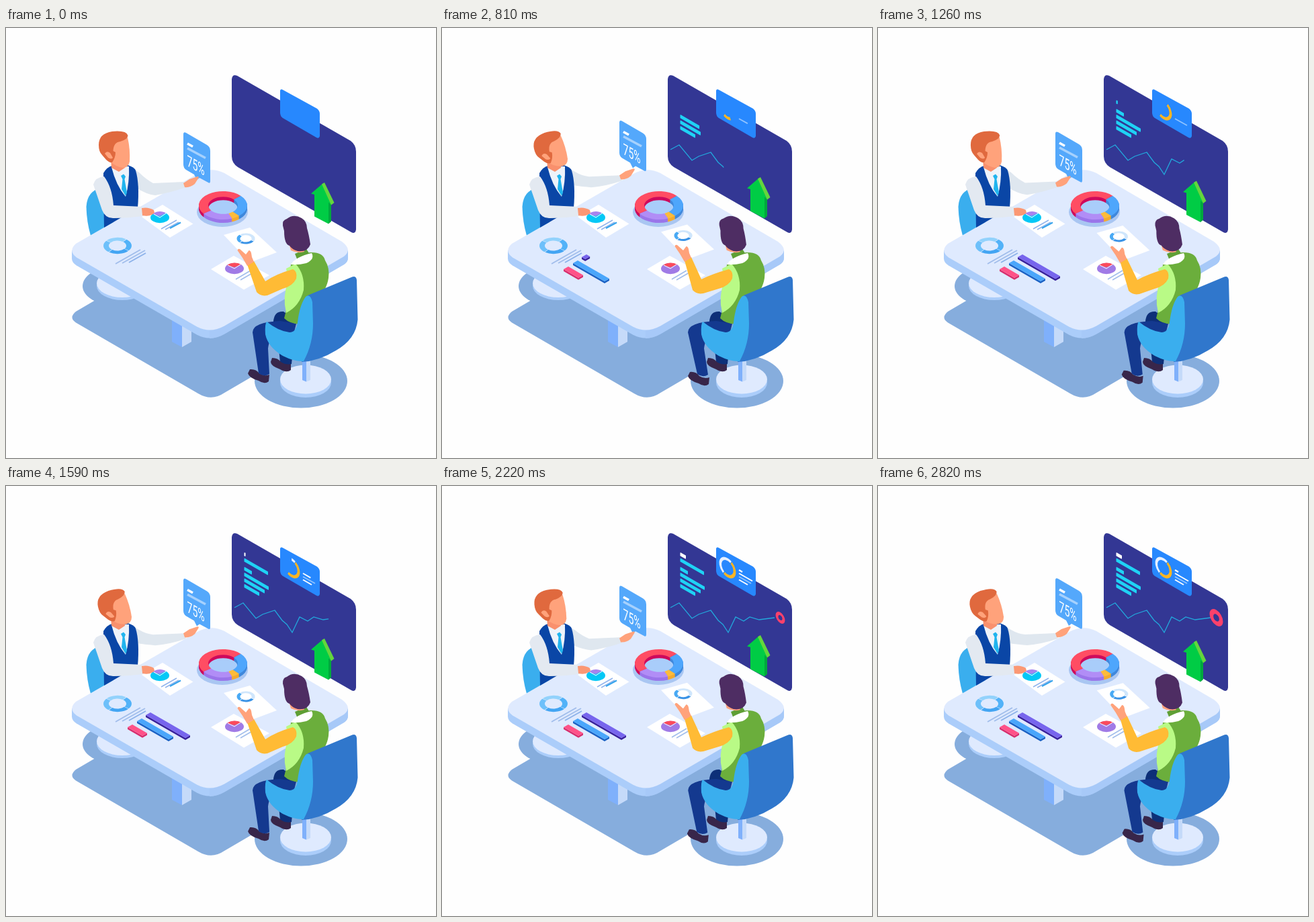
These frames come from a looping animation (640 by 640 pixels, 2.85 s). An HTML page with a canvas:

```html
<!DOCTYPE html>
<html lang="en">
<head>
<meta charset="utf-8">
<title>Meeting</title>
<style>
html, body { margin: 0; width: 100%; height: 100%; overflow: hidden; background: #fefefe; }
canvas { display: block; width: 640px; height: 640px; }
</style>
</head>
<body>
<canvas id="c" width="640" height="640"></canvas>
<script>
const g = document.getElementById('c').getContext('2d');
const LOOP = 2850, STEP = 30, ISO = [0.866, 0.5, 0, 1], RAD = Math.PI / 180;
const SHADE = '#86addd', PALE = '#dfeafe', EDGE = '#abcdfa', SKY = '#3aaeee';
const SKIN = '#ffa27b', NAVY = '#14398f', SHOE = '#38264a';

const clamp = v => Math.max(0, Math.min(1, v));
const smooth = v => { v = clamp(v); return v * v * (3 - 2 * v); };
const span = (t, a, b) => smooth((t - a) / (b - a));

function fill(d, color) {
  g.fillStyle = color;
  g.fill(new Path2D(d));
}
function oval(x, y, rx, ry, color) {
  g.fillStyle = color;
  g.beginPath();
  g.ellipse(x, y, rx, ry, 0, 0, 7);
  g.fill();
}
function line(x1, y1, x2, y2, color, w, k = 1) {
  if (k <= 0) return;
  g.strokeStyle = color;
  g.lineWidth = w;
  g.beginPath();
  g.moveTo(x1, y1);
  g.lineTo(x1 + (x2 - x1) * k, y1 + (y2 - y1) * k);
  g.stroke();
}
function at(x, y, draw, matrix = [1, 0, 0, 1]) {
  g.save();
  g.transform(...matrix, x, y);
  draw();
  g.restore();
}
function turn(x, y, deg, draw) {
  g.save();
  g.translate(x, y);
  g.rotate(deg * RAD);
  g.translate(-x, -y);
  draw();
  g.restore();
}
// Flat ring segment, angles in degrees
function ring(x, y, rx, ry, hole, a, b, color) {
  g.fillStyle = color;
  g.beginPath();
  g.ellipse(x, y, rx, ry, 0, a * RAD, b * RAD);
  g.ellipse(x, y, rx * hole, ry * hole, 0, b * RAD, a * RAD, true);
  g.fill();
}
function wedge(x, y, rx, ry, a, b, color) {
  g.fillStyle = color;
  g.beginPath();
  g.moveTo(x, y);
  g.ellipse(x, y, rx, ry, 0, a * RAD, b * RAD);
  g.fill();
}

function table() {
  // floor shadows and far chair
  oval(163, 384, 49, 29, SHADE);
  fill('M104 422L285 316Q305 305 325 315L500 417Q516 429 503 439L325 543Q306 556 286 544L104 438.500Q93 431 104 422Z', SHADE);
  oval(173, 384, 38, 21, EDGE);
  oval(173, 380, 38, 21, PALE);
  fill('M142 238Q121 242 119.500 266Q120 288 126 309L160 300 160 238Z', SKY);
  fill('M247 430H262V475L247 467Z', '#7fb0fb');
  fill('M262 430H276V467L262 475Z', '#c5daf9');
  // slab
  fill('M98 331V343Q98 349 105 353.500L284 456.500Q304 467 325 455.500L503 352Q509 348 509 342V331Z', EDGE);
  fill('M303 449V462Q314 462 325 455.500L503 352Q509 348 509 342V331Z', '#a7c9f8');
  fill('M104 321L285 217Q305 206 325 216L500 318Q516 330 503 340L325 443.500Q304 455 284 444.500L105 341.500Q92 332 104 321Z', PALE);
}

function tableCharts(t) {
  // flat ring and notes
  ['#52b2f8', '#43a5f3', '#6dc0fa', '#92d2fc'].forEach((c, i) =>
    ring(166, 324, 21, 12.2, 0.62, i * 90 - 50, i * 90 + 37, c));
  line(163, 351, 200, 330, '#a2beeb', 2);
  line(173, 350, 207, 331, '#a2beeb', 2);
  line(183, 349, 208, 335, '#8db2ea', 2);

  // raised ring
  oval(322, 274, 38, 22, '#a9c6f2');
  oval(323, 269, 30, 17, '#a9cdfa');
  const parts = [
    [144, 317, '#ff4d63', '#ce0a5c'], [-43, 48, '#4ea6fc', '#3f88dc'],
    [48, 68, '#fdbb3b', '#f3ab30'], [68, 144, '#b18df6', '#9a75ea']];
  for (let z = 5; z >= 0; z--)
    for (const [a, b, top, side] of parts)
      ring(323, 264 + z, 36, 21, 0.61, a, b, z ? side : top);

  bar(208, 341, 59, span(t, 690, 1350), '#7765ed', '#39219c');
  bar(195, 350, 47, span(t, 270, 600), '#4aa6fb', '#1b62c4');
  bar(181, 359, 22, span(t, 120, 360), '#ff5288', '#d82e6d');
}

function bar(x, y, len, k, top, side) {
  if (k <= 0) return;
  const w = len * k, h = w * 0.577;
  at(x, y, () => {
    fill(`M0 0L${w} ${h}L${w + 7} ${h - 4}v3L${w} ${h + 3}L0 3Z`, side);
    fill(`M0 0L7 -4L${w + 7} ${h - 4}L${w} ${h}Z`, top);
  });
}

const graph = [[340, 181], [353, 174], [372, 197], [382, 191], [400, 185], [411, 200],
  [418, 206], [426, 218], [437, 195], [449, 201], [458, 195], [472, 199], [495, 196]];

function trace(k) {
  let total = 0;
  const seg = graph.slice(1).map((p, i) => Math.hypot(p[0] - graph[i][0], p[1] - graph[i][1]));
  seg.forEach(s => total += s);
  let left = total * k;
  if (left <= 0) return;
  g.strokeStyle = '#22a8dc';
  g.lineWidth = 1.3;
  g.beginPath();
  g.moveTo(...graph[0]);
  for (let i = 0; i < seg.length && left > 0; i++) {
    const f = Math.min(1, left / seg[i]), [x, y] = graph[i], [u, v] = graph[i + 1];
    g.lineTo(x + (u - x) * f, y + (v - y) * f);
    left -= seg[i];
  }
  g.stroke();
}

function screen(t) {
  fill('M336 76Q337 68 344 71L513 168Q521 174 521 184V300Q520 307 514 304L345 207Q336 201 336 191Z', '#333794');

  // rows: y, length, start, end, colour
  const rows = [[148.500, 21, 120, 480], [140, 29, 300, 660], [131.500, 35, 540, 930],
    [123, 10, 900, 1140], [110, 34, 1230, 1560], [101.500, 7, 1560, 1740, '#ffffff']];
  for (const [y, len, a, b, c = '#1fd3f5'] of rows) {
    const w = len * span(t, a, b);
    if (w > 0) fill(`M354.500 ${y - 1.500}q0 -1.500 1.500 -.5l${w} ${w * 0.577}v4q0 1.500 -1.500 .5L354.500 ${y + 2.500}Z`, c);
  }
  trace(1 - Math.pow(1 - clamp((t - 300) / 1900), 2.3));
  const r = span(t, 2010, 2340);
  if (r > 0) at(503.500, 196, () => ring(0, 0, 11.500 * r, 11.500 * r, 0.44, 0, 360, '#fb416b'), ISO);

  // pinned card
  fill('M408 93Q409 90 412 92L463 120Q467 123 467 128V161Q466 165 462 163L412 134Q408 131 408 126Z', '#2788fe');
  const gold = span(t, 540, 1290), white = span(t, 1380, 2220);
  at(425, 121.500, () => {
    if (white > 0) ring(0, 0, 14.300, 14.300, 0.72, -62 - 174 * white, -62, '#e6f0ff');
    if (gold > 0) ring(0, 0, 14.300, 14.300, 0.70, 118 - 176 * gold, 118, '#fbb522');
  }, ISO);
  line(442, 135, 460, 145, '#8fc3ff', 1.8, span(t, 480, 990));
  line(442, 125, 447, 128, '#ffffff', 2.2, span(t, 1620, 1830));
  line(442, 130, 462, 141.500, '#ffffff', 2, span(t, 1410, 1740));
  line(442, 139.500, 455, 147, '#ffffff', 2, span(t, 1290, 1560));
}

function arrow(t) {
  const p = t % 1400, k = smooth(p / 450) - smooth((p - 1020) / 380);
  at(0, -8 * k, () => {
    fill('M479 257L484 262V288L480 291.500Z', '#00a83d');
    fill('M472 231L454 246.500 459 248V280.500L480 291.500V259.500L484 263Z', '#00cc45');
    fill('M470 232.500L474 230 488.500 260 484 263.500Z', '#64d63c');
  });
}

function papers(h) {
  fill('M202 281L233 263 278.500 291.500 244 312Z', '#fff');
  oval(229, 282, 14, 8.200, '#04c8f6');
  wedge(229, 280, 12, 7, 205, 318, '#a883ee');
  line(229, 282, 220, 277, '#fff', 1);
  line(229, 282, 238, 276, '#fff', 1);
  line(231, 299, 254, 286, '#92b4ec', 1.6);
  line(237, 300, 257, 289, '#92b4ec', 1.6);
  line(244, 298, 260, 289.500, '#36a4ec', 2);

  fill('M305 359L339 339 392 368 354 389.500Z', '#fff');
  oval(340, 358, 14, 8.200, '#a07be6');
  wedge(340, 356, 12, 6.500, 205, 325, '#fb4b5c');
  line(340, 358, 330, 353, '#fff', 1);
  line(340, 358, 349, 352, '#fff', 1);
  line(342, 374, 364, 361, '#a2beeb', 1.6);
  line(349, 375, 369, 363.500, '#a2beeb', 1.6);

  at(2 * h, -4.5 * h, () => {
    fill('M324 308L363 297 403 334 363 349Z', '#fff');
    ring(357, 313.500, 13.500, 8, 0.64, 30, 130, '#3a93e6');
    ring(357, 313.500, 13.500, 8, 0.64, 135, 225, '#48a9f4');
    ring(357, 313.500, 13.500, 8, 0.64, 230, 385, '#cfe6fc');
  });
}

function leftMan(k) {
  // reaching arm
  const e = 10 * k, s = 12 * k;
  fill(`M188 209L198 ${215 - k}Q208 ${225 - 5 * k} 219 ${231 - e}L265 ${229 - e} 268 ${237 - e}Q245 ${245 - e} 222 ${249 - s}Q210 ${248 - s} 194 ${238 - 4 * k}Z`, '#dfe7ef');
  // torso
  fill('M158 205Q150 207 145 216L145 235 146 297 196 268Q199 232 193 212Q191 207 181 204Z', '#0a46a6');
  fill('M157 207Q164 235 178 251Q184 230 183 206Z', '#eef3fa');
  fill('M156 194L176 196 177 208 168 214 157 208Z', '#f9906d');
  fill('M171 220L175 217.500 178 221 176.500 225 180 245 178 250 172 240 173.500 225Z', '#20b4ee');
  // near arm
  fill('M130 233Q133 222 146 221Q158 237 160 264L203 266 204 280Q180 283 161 283Q148 284 143 271Z', '#e3e9f1');
  fill('M202 268Q212 266 220 271L221 275 217 278Q211 281 203 279Z', '#fb9874');

  // head
  turn(165, 182, -12 * k, () => {
    fill('M157 172L181 163Q185 180 184 199Q182 208 174 208Q164 207 154 198Z', SKIN);
    fill('M138 174Q138 157 158 154Q179 152 181.500 160Q181 166 170 169Q160 170 159.500 183L163 185Q163 193 158 200Q154 201 149 196L143 189Q138 184 138 174Z', '#e0693e');
    fill('M147 187Q150 182 155 186L159 193Q157 196 152 193Z', SKIN);
  });

  // raised card
  at(0, -18 * k, () => {
    fill('M264 158Q264 154 268 156L299 174Q304 177 304 183V228Q304 232 301 230L288 223 284 226 280 218 268 211Q264 208 264 203Z', '#54a8fb');
    line(270, 172, 278, 176.500, '#ffffff', 3.500);
    line(270, 179, 297, 193.500, '#a6d1fd', 3.500);
    at(269.500, 205, () => {
      g.fillStyle = '#fff';
      g.font = '400 23px Roboto, "Open Sans", sans-serif';
      g.fillText('75%', 0, 0);
    }, [0.61, 0.352, 0, 1]);
  });
  at(0, -12 * k, () =>
    fill('M264 231L273 225 285 221Q288 221 286 224L281 232Q274 238 266 237Z', SKIN));
}

function rightMan(h, s) {
  oval(439, 525.500, 69, 40, SHADE);
  oval(446, 528, 38, 22, EDGE);
  oval(446, 523, 38, 21.500, PALE);
  fill('M441 490H447V526.500L441 524Z', '#7fb0fb');
  fill('M447 490H453V524L447 526.500Z', '#c5daf9');

  // legs
  fill('M404 458L428 470 425 500Q415 505 408 497Z', '#0d3079');
  fill('M396 491Q405 491 409 497Q417 502 424 500V509Q418 514 408 508Q394 503 394 497Z', SHOE);
  fill('M398 437Q399 421 413 422L430 434 428 448Z', '#0d2f78');
  const x = 4 * s;
  at(6 * s, 4 * s, () =>
    fill('M363 508Q372 507 377 514Q385 519 392 516L391 526Q385 531 376 525Q362 521 360 514Z', SHOE));
  fill(`M432 440L408 436Q${367 - s} 438 ${367 - s} 453L${376 + x} ${514 + s}Q${384 + x} ${520 + s} ${392 + x} ${515 + s}L390 477Q392 460 402 456L428 456Z`, NAVY);

  // torso
  fill('M424 352L452 334Q472 333 475 346Q482 357 480 372Q477 392 462 402L437 441Q422 440 414 432L417 420Z', '#6bae3c');
  fill('M417 358L431 351Q445 366 443 390Q437 414 417 424Q411 400 420 377Z', '#b9fa86');
  fill('M430 336L447 329 453 338 434 346Z', '#5f9f35');
  fill('M424 352Q430 341 455 335Q460 344 447 350Q435 353 424 352Z', '#fff');

  // raised arm
  const dx = 2 * h, dy = -6 * h, el = -3 * h;
  fill(`M427 359Q434 362 432 373Q427 384 412 388L389 ${398 + el}Q379 ${400 + el} 373 ${393 + el}L${359 + dx} ${352 + dy} ${369 + dx} ${347 + dy} 386 ${377 + el}Q402 366 427 359Z`, '#ffbb35');
  at(dx, dy, () =>
    fill('M359 354L352 342 344.500 331Q345 328 348 329L357 337 361.500 331Q364 331 365 335L366 341 369 348Z', SKIN));

  // head
  turn(433, 320, 1.5 * h, () => {
    fill('M420 317L444 323 444 333Q434 336 424 331Z', '#ffa07c');
    fill('M412 294Q411 286 418 284Q428 276 440 283Q448 288 448 298Q451 308 453 322Q449 334 434 332Q425 329 422 324Q414 322 414 302Z', '#4e2d63');
  });

  // chair
  fill('M449 398L514 371Q521 368 522 375L523.500 434Q521 463 491 480Q465 496 440 497Z', '#3077cc');
  fill('M388 437Q385 440 386 456Q390 475 412 488Q430 497 443 496Q457 470 457 440L456 408Q453 395 446 400Q437 412 434 438Q432 453 422 453Q405 451 388 437Z', SKY);
}

function frame(now) {
  const t = Math.floor(now % LOOP / STEP) * STEP;
  const p = t % 1200, lift = smooth(p / 430) - smooth((p - 770) / 430);
  const sway = (1 - Math.cos(t / 1640 * Math.PI * 2)) / 2;
  const hand = 1 - (1 - sway) ** 2;
  g.fillStyle = '#fefefe';
  g.fillRect(0, 0, 640, 640);
  screen(t);
  table();
  arrow(t);
  tableCharts(t);
  papers(hand);
  leftMan(lift);
  rightMan(hand, sway);
}

const start = performance.now();
function tick() {
  frame(performance.now() - start);
  requestAnimationFrame(tick);
}
tick();
</script>
</body>
</html>
```
